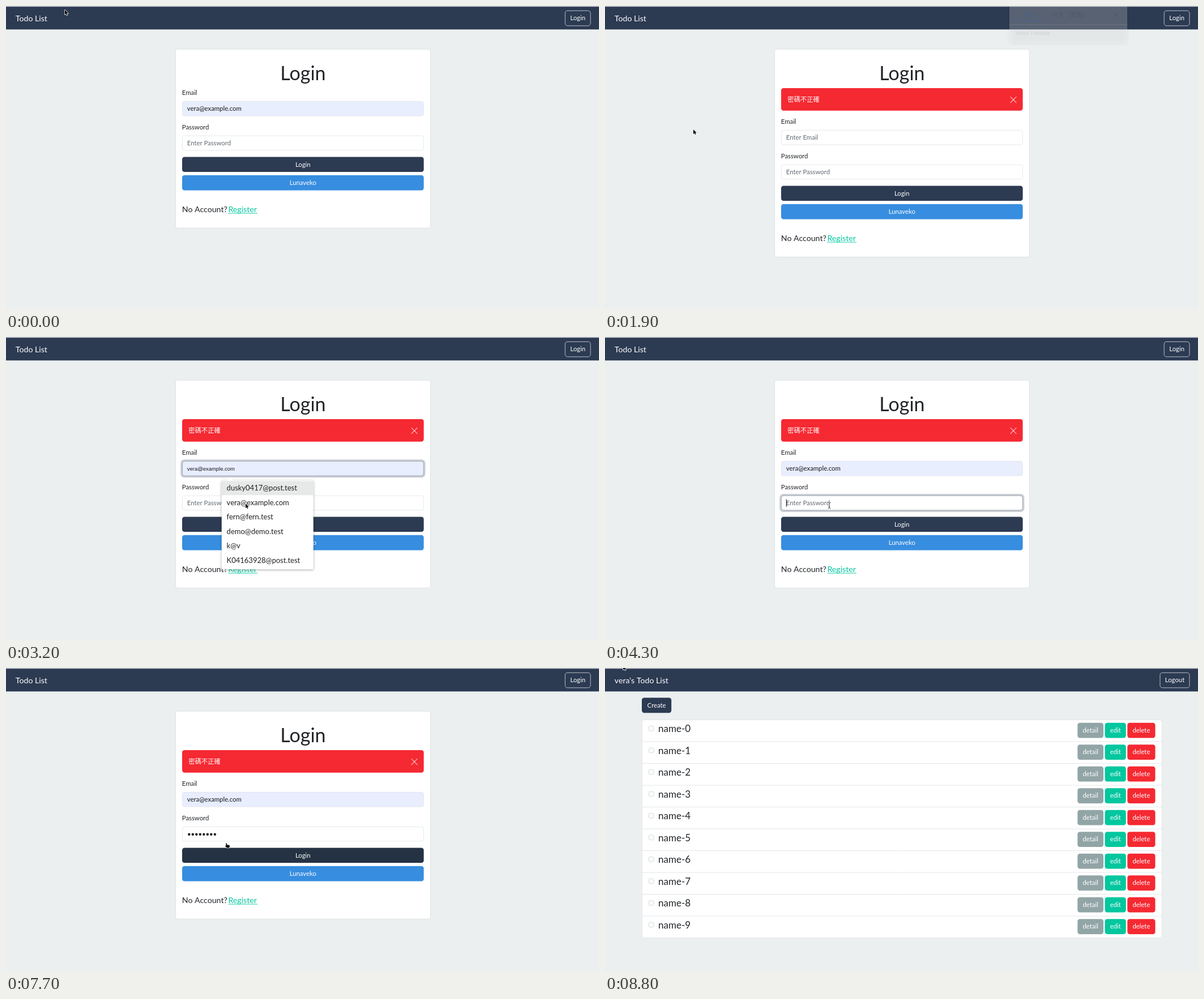
Recreate the animation shown at these times as an HTML page with a canvas. Size 1047 by 535 pixels, loop 8900 ms.

```html
<!DOCTYPE html>
<html lang="en">
<head>
<meta charset="utf-8">
<title>Todo List</title>
<style>
html, body { margin: 0; width: 100%; height: 100%; overflow: hidden; background: #ebeff0; }
canvas { display: block; width: 1047px; height: 535px; }
</style>
</head>
<body>
<canvas id="stage"></canvas>
<script>
const W = 1047, H = 535, LOOP = 8900, STEP = 100;
const canvas = document.getElementById('stage');
const ratio = window.devicePixelRatio || 1;
canvas.width = W * ratio;
canvas.height = H * ratio;
const ctx = canvas.getContext('2d');

const NAVY = '#2c3a52', NAVY_DARK = '#253243', BLUE = '#378ddf', RED = '#f52932',
      GREEN = '#02c79f', GRAY = '#92a5a6', INK = '#212529', HINT = '#626a72',
      PAGE = '#ebeff0', FILL = '#e8eefe', LINE = '#dfe3e6';
const LATO = 'Lato, sans-serif', ARIAL = '"Liberation Sans", sans-serif',
      CJK = '"Noto Sans CJK TC", "Noto Sans CJK", sans-serif';
const BASE = 11.34, LARGE = 14.17;

const USER = 'vera', EMAIL = USER + '@example.com';
const SAVED = ['dusky0417@post.test', EMAIL, 'fern@fern.test', 'demo@demo.test', 'k@v', 'K04163928@post.test'];

// time, x, y, pointer shape
const PATH = [
  [0, 104, 7, 'arrow'], [100, 104, 7, 'arrow'], [300, 140, 50, 'arrow'],
  [500, 310, 205, 'arrow'], [600, 350, 238, 'beam'], [1000, 350, 241, 'beam'],
  [1100, 343, 268, 'hand'], [1200, 337, 276, 'hand'], [1500, 337, 276, 'hand'],
  [1600, 310, 268, 'arrow'], [1900, 156, 218, 'arrow'], [2000, 156, 219, 'arrow'],
  [2300, 302, 218, 'arrow'], [2400, 392, 229, 'beam'], [3000, 392, 229, 'beam'],
  [3100, 403, 260, 'arrow'], [3200, 423, 294, 'arrow'], [4000, 423, 294, 'arrow'],
  [4100, 423, 296, 'beam'], [4300, 396, 297.5, 'beam'], [4400, 398, 296, 'none'],
  [5700, 398, 296, 'beam'], [5900, 399, 296, 'beam'], [6200, 399, 296, 'none'],
  [7100, 399, 297, 'beam'], [7300, 397, 322, 'hand'], [7500, 393, 323, 'hand'],
  [7700, 388, 309, 'hand'], [7800, 388, 309, 'hand'], [7900, 174, 139, 'arrow'],
  [8000, 174, 139, 'arrow'], [8600, 62, 34, 'arrow'], [8800, 32, -5, 'arrow']
];
const KEYS = [4400, 4800, 5200, 5600, 5900, 6200, 6600, 6900];

function box(x, y, w, h, r, fill, stroke, lw = 0.8) {
  ctx.beginPath();
  ctx.roundRect(x, y, w, h, r);
  if (fill) { ctx.fillStyle = fill; ctx.fill(); }
  if (stroke) { ctx.strokeStyle = stroke; ctx.lineWidth = lw; ctx.stroke(); }
}

function line(x1, y1, x2, y2, color, lw) {
  ctx.beginPath();
  ctx.moveTo(x1, y1);
  ctx.lineTo(x2, y2);
  ctx.strokeStyle = color;
  ctx.lineWidth = lw;
  ctx.stroke();
}

function text(s, x, y, size, color, family = LATO, align = 'left') {
  ctx.font = size + 'px ' + family;
  ctx.fillStyle = color;
  ctx.textAlign = align;
  ctx.fillText(s, x, y);
}

function button(label, x, y, w, fill, stroke) {
  box(x, y, w, 26.6, 4.2, fill, stroke);
  text(label, x + w / 2, y + 17, BASE, '#fff', LATO, 'center');
}

function shadow(blur, dy, alpha) {
  ctx.shadowColor = `rgba(0,0,0,${alpha})`;
  ctx.shadowBlur = blur * ratio;
  ctx.shadowOffsetY = dy * ratio;
}

function frame(title, action, x) {
  ctx.fillStyle = PAGE;
  ctx.fillRect(0, 0, W, H);
  ctx.fillStyle = NAVY;
  ctx.fillRect(0, 1, W, 40.4);
  ctx.fillStyle = '#cfd6da';
  ctx.fillRect(0, 0, W, 1.2);
  text(title, 16.8, 26.5, LARGE, '#fff');
  button(action, x, 8.3, 1032 - x, null, '#dfe3e8');
}

function field(y, o) {
  const x = 311, w = 426.6, h = 26.4;
  if (o.focus) box(x - 2.8, y - 2.8, w + 5.6, h + 5.6, 6.5, '#cbced4');
  box(x + 0.35, y + 0.35, w - 0.7, h - 0.7, 4, o.filled ? FILL : '#fff', o.focus ? '#8f98a5' : LINE);
  const base = y + 17;
  if (o.dots) {
    ctx.fillStyle = '#16191c';
    for (let i = 0; i < o.dots; i++) {
      ctx.beginPath();
      ctx.arc(323.3 + i * 6.5, y + 13.9, 2.2, 0, 7);
      ctx.fill();
    }
  } else if (o.value) {
    text(o.value, 319.8, o.preview ? base - 0.3 : base, o.preview ? 9.45 : BASE, '#15181b', o.preview ? ARIAL : LATO);
  } else {
    text(o.hint, 319.8, base, BASE, HINT);
  }
  if (o.caret) {
    ctx.fillStyle = '#111';
    ctx.fillRect(319.8 + (o.dots || 0) * 6.5, y + 6.6, 1, 13.4);
  }
}

function login(s) {
  const d = s.failed ? 51 : 0;
  frame('Todo List', 'Login', 987.2);
  box(299.4, 76.2, 450, 316 + d, 4.2, '#fff', '#d8dcde');
  text('Login', 524.4, 131, 34, INK, LATO, 'center');
  if (s.failed) {
    box(311, 145, 426.6, 39.8, 4.2, RED);
    text('密碼不正確', 322.3, 168.8, BASE, '#fff', CJK);
    line(715.6, 160.2, 726.4, 171, 'rgba(255,255,255,.65)', 1.2);
    line(726.4, 160.2, 715.6, 171, 'rgba(255,255,255,.65)', 1.2);
  }
  text('Email', 310.8, 157 + d, BASE, INK);
  field(168 + d, s.email);
  text('Password', 310.8, 217.7 + d, BASE, INK);
  field(228.8 + d, s.pass);
  button('Login', 311, 266.5 + d, 426.6, s.hover ? NAVY_DARK : NAVY);
  button('Lunaveko', 311, 298.8 + d, 426.6, BLUE);
  text('No Account? ', 310.8, 364 + d, LARGE, INK);
  text('Register', 392.4, 364 + d, LARGE, GREEN);
  line(392.4, 366 + d, 444, 366 + d, GREEN, 0.9);
}

function suggestions(active) {
  ctx.save();
  shadow(4, 1, 0.35);
  box(380.7, 253.3, 162, 157, 1.5, '#fff');
  ctx.restore();
  ctx.beginPath();
  ctx.moveTo(389, 253.6);
  ctx.lineTo(395.2, 247.2);
  ctx.lineTo(401.4, 253.6);
  ctx.fillStyle = '#fff';
  ctx.fill();
  ctx.fillStyle = '#e7e8e8';
  ctx.fillRect(380.7, 254.3 + active * 25.5, 162, 25);
  SAVED.forEach((s, i) => text(s, 389.6, 271.4 + i * 25.5, 13, '#202224'));
}

function translateBubble(alpha) {
  ctx.save();
  ctx.globalAlpha = alpha;
  ctx.save();
  shadow(6, 1, 0.3);
  box(714, -8, 208, 73, 5, '#fff');
  ctx.restore();
  text('英文', 738.5, 20, 11, '#1a5fc8', CJK);
  ctx.fillStyle = '#1a5fc8';
  ctx.fillRect(725, 25, 49.5, 1.4);
  text('中文（繁體）', 788, 20, 11, '#3c4043', CJK);
  ctx.fillStyle = '#3c4043';
  for (let i = -1; i < 2; i++) ctx.fillRect(880.2, 15.2 + i * 3.5, 1.6, 1.6);
  line(900, 13, 906, 19, '#3c4043', 1.2);
  line(906, 13, 900, 19, '#3c4043', 1.2);
  line(714, 33, 922, 33, '#e4e6e8', 0.7);
  text('Vorlen Translate', 725, 51.3, 8.4, '#80868b', ARIAL);
  ctx.restore();
}

function todos() {
  const pitch = 38.5;
  frame(USER + "'s Todo List", 'Logout', 980);
  button('Create', 65, 52.6, 52.2, NAVY);
  box(65.3, 91.5, 918, pitch * 10, 4.2, '#fff', '#dde1e3');
  for (let i = 0; i < 10; i++) {
    const y = 91.5 + i * pitch;
    if (i) line(65.3, y, 983.3, y, '#dde1e3', 0.8);
    box(77.4, y + 11, 8.6, 8.6, 1.8, '#fbfbfb', '#cfd2d5');
    text('name-' + i, 94, y + 21.6, 17, INK);
    button('detail', 834.3, y + 5.3, 45.8, GRAY);
    button('edit', 882.6, y + 5.3, 37.2, GREEN);
    button('delete', 922.3, y + 5.3, 49.2, RED);
  }
}

function outline(path, scale) {
  ctx.scale(scale, scale);
  ctx.lineJoin = 'round';
  const p = new Path2D(path);
  ctx.strokeStyle = '#fff';
  ctx.lineWidth = 1.5;
  ctx.stroke(p);
  ctx.fillStyle = '#000';
  ctx.fill(p);
}

const POINTERS = {
  arrow() { outline('M0 0V8.6L2 6.8L3.3 9.8L4.7 9.2L3.4 6.3H6.1Z', 0.95); },
  hand() { outline('M0 .9Q.8-.5 1.7.8L2.4 3.3L6.6 4Q7.6 4.4 7.3 6L6.5 9H2.2L-1 5.8Q-1.2 4.6 0 4.8L.9 5.2Z', 0.95); },
  beam() {
    const p = new Path2D('M-2.4-5Q0-5 0-4Q0-5 2.4-5M0-4V4M-2.4 5Q0 5 0 4Q0 5 2.4 5M-1 2H1');
    ctx.strokeStyle = 'rgba(255,255,255,.8)';
    ctx.lineWidth = 2;
    ctx.stroke(p);
    ctx.strokeStyle = '#222';
    ctx.lineWidth = 0.9;
    ctx.stroke(p);
  },
  none() {}
};

function pointer(t) {
  let i = PATH.length - 1;
  while (PATH[i][0] > t) i--;
  const a = PATH[i], b = PATH[i + 1] || a;
  const k = b === a ? 0 : (t - a[0]) / (b[0] - a[0]);
  ctx.save();
  ctx.translate(a[1] + (b[1] - a[1]) * k, a[2] + (b[2] - a[2]) * k);
  POINTERS[a[3]]();
  ctx.restore();
}

function loginState(t) {
  const within = (a, b) => t >= a && t < b;
  if (t < 1600) {
    return {
      email: { value: EMAIL, filled: true },
      pass: { hint: 'Enter Password', focus: within(700, 1400), caret: within(700, 1400), dots: t >= 1000 ? 1 : 0 },
      hover: t >= 1300
    };
  }
  const preview = within(3200, 4100), typing = within(4300, 7500);
  return {
    failed: true,
    email: {
      value: t >= 3200 ? EMAIL : '', hint: 'Enter Email', preview,
      filled: t >= 3200, focus: within(2900, 4300), caret: within(2900, 3200)
    },
    pass: { hint: 'Enter Password', focus: typing, caret: typing, dots: KEYS.filter(k => k <= t).length },
    hover: t >= 7300
  };
}

function draw(t) {
  ctx.setTransform(ratio, 0, 0, ratio, 0, 0);
  if (t < 7900) {
    login(loginState(t));
    if (t >= 3000 && t < 4100) suggestions(t < 3400 ? 0 : 1);
    if (t >= 1900 && t < 3000) translateBubble(t < 2000 ? 0.22 : t < 2900 ? 1 : 0.5);
  } else {
    todos();
  }
  pointer(t);
}

let start = null;
function tick(now) {
  if (start === null) start = now;
  draw(Math.floor(((now - start) % LOOP) / STEP) * STEP);
  requestAnimationFrame(tick);
}
draw(0);
requestAnimationFrame(tick);
</script>
</body>
</html>
```
